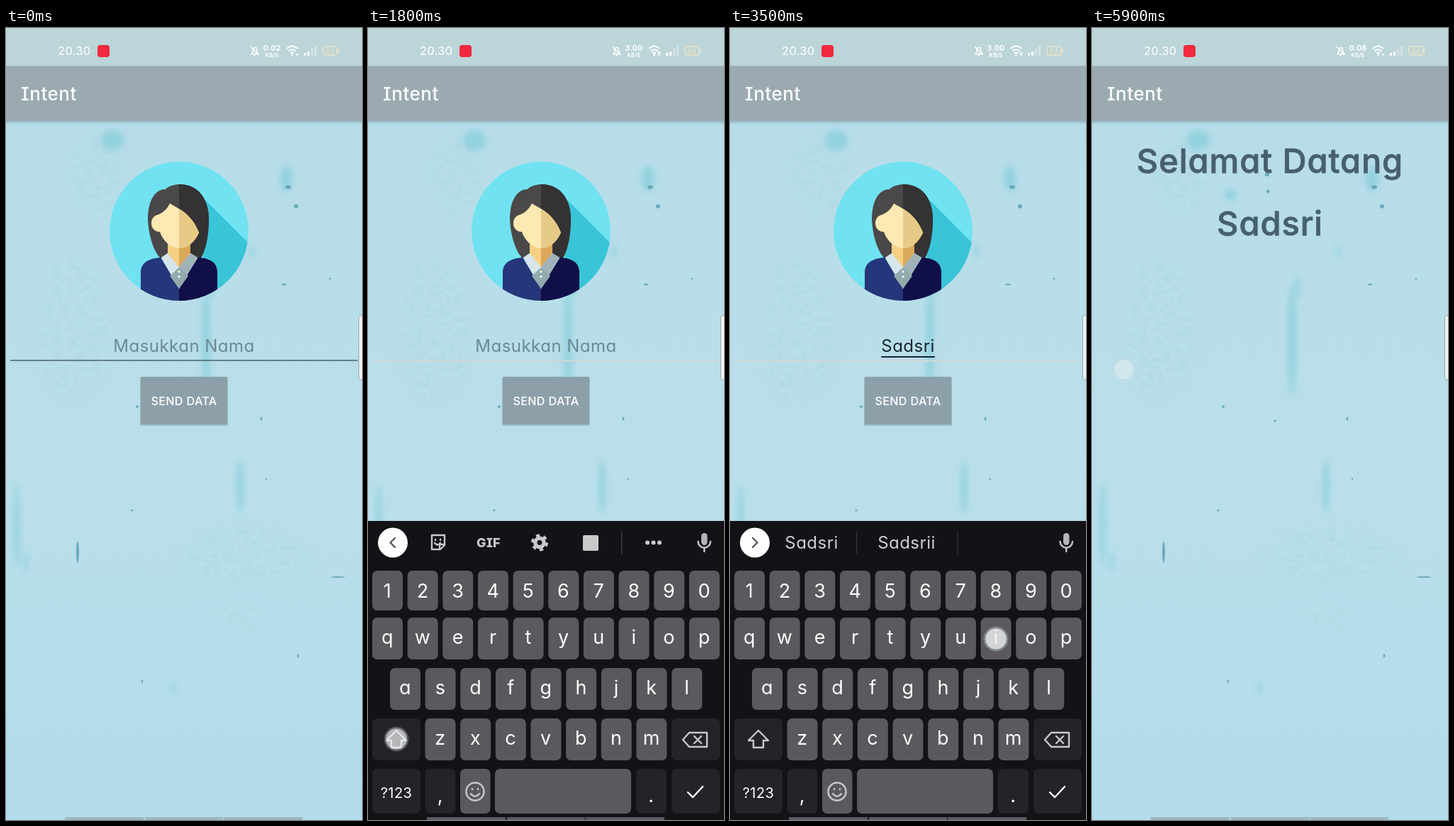
Animation, 502 px wide and 1115 px high, one loop 6000 ms. Source, as an HTML page:

```html
<!DOCTYPE html>
<html lang="id">
<head>
<meta charset="utf-8">
<title>Intent</title>
<style>
  html, body { margin: 0; width: 100%; height: 100%; overflow: hidden; background: #bcd5d8; }
  svg { display: block; width: 100%; height: 100%; }
  text {
    font-family: Inter, "Open Sans", sans-serif;
    font-feature-settings: "cv08", "cv11";
    letter-spacing: .02em;
    stroke-linejoin: round;
  }
  .mid { text-anchor: middle; }
  .title { font-size: 26px; font-weight: 500; fill: #fff; }
  .welcome { font-size: 47px; font-weight: 500; fill: #47606c; stroke: #47606c; stroke-width: .8; }
  .field { font-size: 24px; }
  .key { font-size: 27px; fill: #fff; }
  .hint { font-size: 24px; fill: #d2d1d4; }
  .line { fill: none; stroke: #c9c8cb; stroke-width: 2.4; stroke-linejoin: round; stroke-linecap: round; }
</style>
</head>
<body>
<svg viewBox="0 0 502 1115" preserveAspectRatio="none">
  <defs>
    <linearGradient id="paint" x2="0" y2="1">
      <stop offset="0" stop-color="#b5dce8"/>
      <stop offset=".55" stop-color="#badfea"/>
      <stop offset="1" stop-color="#b2dcec"/>
    </linearGradient>
    <linearGradient id="drop" x2="0" y2="1">
      <stop stop-color="#4c6b76" stop-opacity=".3"/>
      <stop offset="1" stop-color="#4c6b76" stop-opacity="0"/>
    </linearGradient>
    <filter id="soft" x="-1" y="-1" width="3" height="3"><feGaussianBlur stdDeviation="4"/></filter>
    <filter id="rough" x="-.3" y="-.3" width="1.6" height="1.6">
      <feTurbulence type="fractalNoise" baseFrequency=".09 .14" numOctaves="3" seed="4"/>
      <feColorMatrix values="0 0 0 0 .42  0 0 0 0 .69  0 0 0 0 .76  4 0 0 0 -1.75" result="grain"/>
      <feGaussianBlur in="SourceAlpha" stdDeviation="9"/>
      <feComposite in="grain" operator="in"/>
    </filter>
    <clipPath id="disc"><circle cx="244" cy="286" r="98"/></clipPath>
    <clipPath id="rightHalf"><rect x="244" y="180" width="110" height="210"/></clipPath>
    <path id="hair" d="M218 324C207 314 200 287 200 266C201 243 210 227 225 227C230 222 238 220 246 220C272 221 286 241 286 270C286 294 281 313 275 324Z"/>
    <path id="face" d="M231 247C247 256 262 263 272 288C266 302 256 310 244 310C231 309 221 299 217 287C209 287 205 281 205 275C205 268 209 264 214 263C222 260 227 255 231 247Z"/>
    <path id="neck" d="M228 300H260V324L244 340L228 324Z"/>
    <path id="coat" d="M190 390V345C190 331 199 325 218 323L244 366L271 323C290 325 298 331 298 345V390Z"/>
    <path id="shirt" d="M219 323L228 317L244 337L260 317L270 323L244 367Z"/>

    <g id="page">
      <rect width="502" height="1115" fill="url(#paint)"/>
      <g id="patches"></g>
      <rect width="502" height="54" fill="#bcd5d8"/>
      <rect y="131" width="502" height="5" fill="url(#drop)"/>
      <rect y="53.5" width="502" height="77.5" fill="#9aaab0"/>
      <text class="title" x="21" y="101.5">Intent</text>
    </g>
  </defs>

  <g id="formScreen">
    <use href="#page"/>
    <g clip-path="url(#disc)">
      <circle cx="244" cy="286" r="98" fill="#70e2f1"/>
      <path d="M281 242L345 306V390H275Z" fill="#39c4d8"/>
      <g id="woman"></g>
    </g>
    <circle cx="244" cy="343" r="1.6" fill="#fff"/><circle cx="244" cy="350" r="1.6" fill="#fff"/>
    <rect id="rule" x="6" width="490"/>
    <text id="placeholder" class="field mid" x="251" y="456" fill="#6c8994">Masukkan Nama</text>
    <text id="typed" class="field mid" x="251" y="456" fill="#15262c"></text>
    <rect id="underline" y="462" height="2" fill="#15262c"/>
    <rect id="caret" y="433" width="2" height="28" fill="#cbdde2"/>
    <rect x="189" y="492" width="124" height="68" rx="2" fill="#4c6b76" opacity=".3"/>
    <rect x="190" y="491" width="122" height="67" rx="1" fill="#8da0a9"/>
    <text class="mid" x="251" y="530.5" font-size="16.2" font-weight="500" fill="#fff">SEND DATA</text>

    <g id="keyboard">
      <rect y="694" width="502" height="450" fill="#141216"/>
      <circle cx="35" cy="724.5" r="21" fill="#fff"/>
      <path id="chevron" class="line" style="stroke:#55555a"/>
      <g id="tools">
        <path class="line" d="M90 714H108V728L102 734H90ZM108 727H101V734M94 725Q98 730 102 725M95 720V721M102 720V721"/>
        <text class="mid" x="170" y="731" font-size="18" font-weight="800" fill="#c9c8cb">GIF</text>
        <circle cx="242" cy="724.5" r="6.2" fill="none" stroke="#c9c8cb" stroke-width="5.5"/>
        <circle cx="242" cy="724.5" r="10" fill="none" stroke="#c9c8cb" stroke-width="4" stroke-dasharray="5.2 5.27"/>
        <rect x="303" y="714" width="22" height="22" rx="2" fill="#c9c8cb"/>
        <rect x="357" y="708" width="1.3" height="33" fill="#3d3b40"/>
        <g fill="#c9c8cb"><circle cx="394" cy="724.5" r="3"/><circle cx="402.500" cy="724.5" r="3"/><circle cx="411" cy="724.5" r="3"/></g>
      </g>
      <g id="suggestions">
        <rect x="178" y="708" width="1.3" height="33" fill="#343238"/>
        <rect x="320.500" y="708" width="1.3" height="33" fill="#343238"/>
        <text class="hint mid" x="115" y="733"></text>
        <text class="hint mid" x="249" y="733"></text>
        <text class="hint mid" x="383" y="733"></text>
      </g>
      <rect x="470" y="711" width="8.500" height="17" rx="4.2" fill="#b5b4b7"/>
      <path class="line" d="M465.500 723A8.700 8.700 0 0 0 482.900 723M474.200 732V737"/>
      <g id="keys"></g>
      <path class="line" d="M40 989L54 1003H47V1013H33V1003H26ZM444 1002L453 992H478V1012H453ZM460 997L470 1007M470 997L460 1007"/>
      <g class="line">
        <circle cx="151" cy="1075" r="12.5"/>
        <path d="M145 1078Q151 1085 157 1078M147 1071V1072M155 1071V1072"/>
      </g>
      <path class="line" d="M451 1076L458 1083L472 1068" style="stroke:#fff"/>
      <g id="popup">
        <rect width="53" height="159" rx="4" fill="#a5a3a7"/>
        <text class="mid" x="26.500" y="51" font-size="36" fill="#2b2a2d"></text>
      </g>
    </g>
    <rect id="dim" width="502" height="1115"/>
  </g>

  <g id="resultScreen">
    <use href="#page"/>
    <text class="welcome mid" x="251" y="204">Selamat Datang</text>
    <text class="welcome mid" x="251" y="292">Sadsri</text>
  </g>

  <g id="navHint" fill="#8d9a9f" opacity=".55">
    <rect x="83" y="1111" width="111" height="4"/>
    <rect x="196" y="1111" width="110" height="4"/>
    <rect x="307" y="1111" width="111" height="4"/>
  </g>

  <g id="touches"></g>

  <g fill="#fff">
    <text x="73" y="38" font-size="16.5">20.30</text>
    <rect x="129" y="24" width="17" height="17" rx="4" fill="#f0293f"/>
    <path d="M346 36.500L348 34V30Q350 26.500 353 28L354 34L356 36.500ZM345 26L356 38" fill="none" stroke="#fff" stroke-width="1.4"/>
    <circle cx="350.500" cy="38.500" r="1.3"/>
    <text id="speed" class="mid" x="375" y="32" font-size="10.500" font-weight="700"></text>
    <text class="mid" x="375" y="40.500" font-size="7.500" font-weight="700">KB/S</text>
    <path d="M396 29Q403.500 22 411 29M398.500 32.500Q403.500 28 408.500 32.500M401 35.500Q403.500 33.500 406 35.500" fill="none" stroke="#fff" stroke-width="2"/>
    <circle cx="403.500" cy="38" r="1.4"/>
    <path d="M408 36.500H413L410.500 39.500Z"/>
    <path id="upload" d="M408 35.500H413L410.500 32.500Z"/>
    <path d="M420 35H423V39H420ZM425 33H428V39H425Z"/>
    <path d="M430 29H433V39H430ZM435 25H438V39H435Z" opacity=".35"/>
    <rect x="447" y="26" width="20" height="12" rx="3.500" fill="none" stroke="#eee3c8" stroke-width="1.5"/>
    <rect x="468" y="29.500" width="1.700" height="5" fill="#eee3c8"/>
    <text class="mid" x="457" y="35.700" font-size="9.500" fill="#f3e2b8">84</text>
  </g>
  <rect x="497.500" y="405" width="8" height="90" rx="2" fill="#f1f3f3" stroke="#98a7ac"/>
</svg>

<script>
const LOOP = 6000;
const $ = id => document.getElementById(id);
const clamp = v => Math.min(1, Math.max(0, v));
const show = (el, on) => { el.style.display = on ? "" : "none"; };

function add(parent, tag, attrs, text) {
  const el = document.createElementNS("http://www.w3.org/2000/svg", tag);
  for (const name in attrs) el.setAttribute(name, attrs[name]);
  if (text) el.textContent = text;
  parent.append(el);
  return el;
}
const ellipse = (parent, [cx, cy, rx, ry], extra) =>
  add(parent, "ellipse", { cx, cy, rx, ry, ...extra });

// Wall: rough plaster, soft stains, small specks
const wall = $("patches");
[[125, 210, 38, 58], [95, 425, 55, 105], [335, 742, 85, 42], [325, 832, 42, 24]]
  .forEach(p => ellipse(wall, p, { filter: "url(#rough)", opacity: .62 }));
[[150, 158, 16, 14], [195, 235, 9, 8], [282, 440, 6, 80], [347, 315, 3, 10], [330, 645, 5, 38],
  [15, 700, 4, 60], [395, 212, 9, 18], [290, 365, 3, 16], [236, 929, 3, 7], [28, 752, 3, 14]]
  .forEach(p => ellipse(wall, p, { filter: "url(#soft)", fill: "#75c8d7", opacity: .55 }));
[[101, 738, 2, 15], [360, 550, 1.5, 2.5], [178, 679, 1.6, 1.6], [392, 361, 3.5, 1.2], [412, 884, 1.4, 2.4],
  [192, 920, 1.2, 3], [258, 553, 2.4, 1.2], [185, 533, 2, 2], [248, 230, 2.4, 2.4], [247, 206, 3, 3],
  [457, 353, 1.8, 1], [468, 773, 10, 1], [367, 635, 1.2, 1.2], [398, 224, 4, 2.5], [409, 251, 3, 3]]
  .forEach(p => ellipse(wall, p, { fill: "#4b96a6", opacity: .7 }));

// Each part of the portrait has a lit left and a shaded right half
for (const [id, lit, shade] of [["hair", "#4a4848", "#343233"], ["neck", "#f6d184", "#dca95a"],
  ["face", "#ffe9b3", "#e7ca86"], ["coat", "#25367a", "#100f48"], ["shirt", "#d6e6eb", "#9fb3b8"]]) {
  add($("woman"), "use", { href: "#" + id, fill: lit });
  add($("woman"), "use", { href: "#" + id, fill: shade, "clip-path": "url(#rightHalf)" });
}
add($("woman"), "path", { d: "M244 337L231 349L244 367L257 349Z", fill: "#93aaad" });

// Keyboard
const PITCH = 49.65, keys = {};
function addKey(x, y, w, h, label, dark, size) {
  add($("keys"), "rect", { x, y, width: w, height: h, rx: 7, fill: dark ? "#252327" : "#5b595d" });
  const text = add($("keys"), "text", {
    class: "key mid", x: x + w / 2, y: y + h / 2 + (/\d/.test(label) ? 9.5 : 7)
  }, label);
  if (size) text.style.fontSize = size + "px";
  keys[label] = { cx: x + w / 2, y, text };
}
[["1234567890", 6, 764, 56], ["qwertyuiop", 6, 830, 59], ["asdfghjkl", 31, 901, 59], ["zxcvbnm", 80.5, 972, 59]]
  .forEach(([row, x, y, h]) => [...row].forEach((c, i) => addKey(x + i * PITCH, y, 43, h, c)));
addKey(6, 972, 68, 59, "", true);
addKey(428, 972, 68, 59, "", true);
addKey(6, 1043, 68, 63, "?123", true, 20);
addKey(80.5, 1043, 43, 63, ",", true);
addKey(130, 1043, 42.5, 63, "");
addKey(179, 1043, 192, 63, "");
addKey(378, 1043, 43, 63, ".", true);
addKey(428, 1043, 68, 63, "", true);
keys[","].text.setAttribute("y", 1090);
keys["."].text.setAttribute("y", 1090);
const letters = Object.keys(keys).filter(k => /^[a-z]$/.test(k));

// Touches: start, x, y, strength, key
const PRESS = 100;
const taps = [
  [480, 250, 452, .55], [1800, 40, 1001, .7],
  [2320, 107, 940, .5, "s"], [2450, 45, 923, .85, "a"], [2670, 152, 930, .8, "d"],
  [2880, 105, 927, .65, "s"], [3110, 176, 860, .8, "r"], [3400, 375, 860, .8, "i"],
  [4030, 221, 525, .5], [5800, 45, 481, .42]
].map(([at, x, y, peak, key]) => {
  const dot = add($("touches"), "g", { transform: `translate(${x} ${y})` });
  add(dot, "circle", { r: 17.5, fill: "#dff0f6", opacity: .35 });
  add(dot, "circle", { r: 15, fill: "#f2f4f5", stroke: "#a9b6bc", "stroke-width": 1 });
  return { at, peak, key, dot };
});
const strokes = taps.filter(tap => tap.key);

const NAME = "Sadsri";
const guesses = {
  1: ["S", "D", "Saya"], 2: ["Sa", "Saya", "Sama"], 3: ["Sad", "Sada", "Sadar"],
  4: ["Sads", "Sadsr", "Sadsrinita"], 5: ["Sadsr", "Sadsri", "Sadsrinita"], 6: ["Sadsri", "Sadsrii", ""]
};
const guessTexts = $("suggestions").querySelectorAll("text");

function scaleAbout(el, s) {
  el.setAttribute("transform", `translate(251 557.5) scale(${s}) translate(-251 -557.5)`);
}

function drawField(t, count) {
  const focused = t >= 580, text = $("typed");
  $("rule").setAttribute("y", focused ? 467 : 467.2);
  $("rule").setAttribute("height", focused ? 2.6 : 1.5);
  $("rule").setAttribute("fill", focused ? "#ccd8dc" : "#4b6168");
  show($("placeholder"), !count);
  text.textContent = NAME.slice(0, count);
  const width = count ? text.getComputedTextLength() : 0;
  $("underline").setAttribute("x", 251 - width / 2);
  $("underline").setAttribute("width", width);
  show($("underline"), t < 4100);
  $("caret").setAttribute("x", 252 + width / 2);
  show($("caret"), count > 0);
}

function drawKeyboard(t, count) {
  const left = 1 - clamp((t - 830) / 300);
  $("keyboard").setAttribute("transform", `translate(0 ${40 * left * left})`);
  $("keyboard").setAttribute("opacity", 1 - left ** 3);

  const upper = t >= 1900 && count === 0;
  for (const c of letters) keys[c].text.textContent = upper ? c.toUpperCase() : c;

  show($("tools"), !count);
  show($("suggestions"), count);
  $("chevron").setAttribute("d", count ? "M32 718L38.500 724.500L32 731" : "M38 718L31.500 724.500L38 731");
  guessTexts.forEach((el, i) => { el.textContent = count ? guesses[count][i] : ""; });

  const pressed = strokes.find(s => t >= s.at && t < s.at + PRESS);
  show($("popup"), pressed);
  if (pressed) {
    const key = keys[pressed.key];
    $("popup").setAttribute("transform", `translate(${key.cx - 26.5} ${key.y - 100})`);
    $("popup").lastElementChild.textContent = key.text.textContent;
  }
}

function drawScreens(t) {
  const ease = 1 - (1 - clamp((t - 4180) / 390)) ** 3;
  show($("formScreen"), t < 4600);
  show($("resultScreen"), t > 4200);
  scaleAbout($("formScreen"), 1 + .03 * ease);
  scaleAbout($("resultScreen"), .9 + .1 * ease);
  $("resultScreen").setAttribute("opacity", clamp((t - 4200) / 130));
  $("dim").setAttribute("opacity", t > 4200 ? .45 * ease : 0);
  show($("navHint"), t < 4300 || t >= 4800);
}

function render(t) {
  const count = strokes.filter(s => t >= s.at + PRESS).length;
  drawField(t, count);
  drawKeyboard(t, count);
  drawScreens(t);
  for (const { at, peak, dot } of taps) {
    const age = t - at;
    dot.setAttribute("opacity", age < 0 ? 0 : peak * (1 - clamp((age - PRESS) / 150)));
  }
  const busy = t >= 700 && t < 5200;
  $("speed").textContent = busy ? "3.00" : t < 700 ? "0.02" : "0.08";
  show($("upload"), busy);
}

let start;
function tick(now) {
  start ??= now;
  render((now - start) % LOOP);
  requestAnimationFrame(tick);
}
render(0);
requestAnimationFrame(tick);
</script>
</body>
</html>
```
